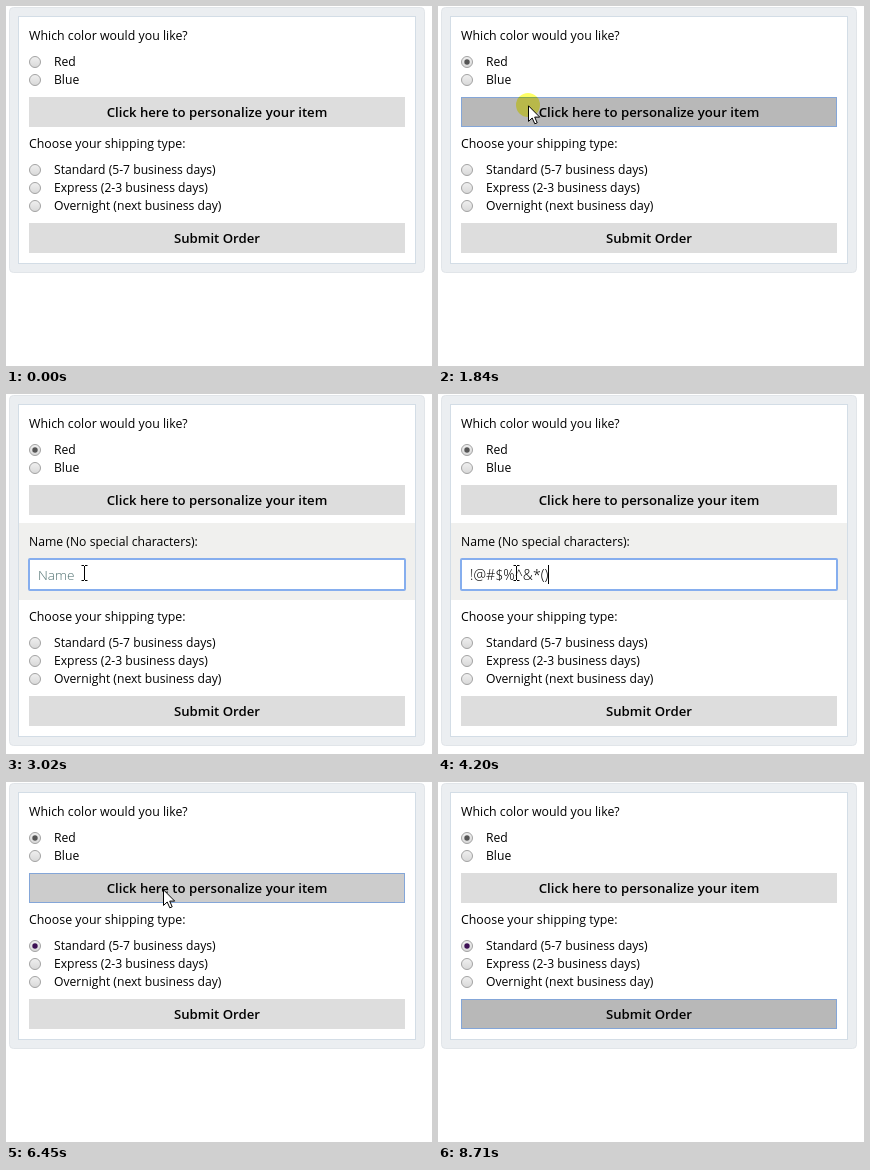
These frames come from a looping animation (426x360 px, 9410 ms). An HTML page:

```html
<!DOCTYPE html>
<html lang="en">
<head>
<meta charset="utf-8">
<title>Order form</title>
<style>
html, body { margin: 0; width: 100%; height: 100%; overflow: hidden; background: #fff; }
svg { display: block; width: 426px; height: 360px; }
text { font: 12.35px "Open Sans", "Noto Sans", sans-serif; fill: #000; white-space: pre; }
.btn { --face: #ddd; }
.btn.hover { --face: #ccc; }
.btn.down { --face: #b8b8b8; }
.btn rect { fill: var(--face); stroke: var(--face); }
.btn.focus rect { stroke: #84a6d8; }
.btn text { font-size: 13.2px; font-weight: 600; text-anchor: middle; }
.radio text { font-size: 12.15px; }
.radio circle { fill: url(#knob); stroke: #a3a3a3; }
.radio .dot { fill: #555; stroke: none; visibility: hidden; }
.radio.on .dot { visibility: visible; }
#standard .dot { fill: #3c1053; }
#nameLabel { font-size: 12.2px; }
#field { fill: #fff; stroke: #d9d9d9; }
#ring { fill: none; stroke: #86aeee; stroke-width: 2; }
#typed, #hint { font-size: 14.2px; font-weight: 300; }
#hint { font-size: 13.6px; fill: #4f7070; }
#spot { fill: #ffff66; mix-blend-mode: multiply; }
</style>
</head>
<body>
<svg viewBox="0 0 426 360">
  <defs>
    <linearGradient id="knob" x2="0" y2="1">
      <stop stop-color="#f0f0f0"/><stop offset="1" stop-color="#d8d8d8"/>
    </linearGradient>
  </defs>
  <rect id="frame" x="3.5" y="1.5" width="415" height="265" rx="4" fill="#ebeef1" stroke="#e1e5e9"/>
  <rect id="sheet" x="12.5" y="10.5" width="397" height="247" fill="#fff" stroke="#d3dde6"/>

  <text x="23" y="34">Which color would you like?</text>
  <g class="radio" id="red" data-y="56" data-label="Red"></g>
  <g class="radio" data-y="74" data-label="Blue"></g>
  <g class="btn" id="personalize">
    <rect x="23.5" y="91.5" width="375" height="29"/>
    <text x="211" y="111">Click here to personalize your item</text>
  </g>

  <g id="panel">
    <rect x="13" y="129" width="396" height="77" fill="#f0f0ee"/>
    <text id="nameLabel" x="23" y="152">Name (No special characters):</text>
    <rect id="field" x="23.5" y="165.5" width="375" height="30"/>
    <rect id="ring" x="23" y="165" width="376" height="31" rx="1"/>
    <text id="hint" x="32" y="186">Name</text>
    <text id="typed" x="32" y="186"></text>
    <rect id="caret" y="171" width="1" height="19"/>
  </g>

  <g id="lower">
    <text x="23" y="142">Choose your shipping type:</text>
    <g class="radio" id="standard" data-y="164" data-label="Standard (5-7 business days)"></g>
    <g class="radio" data-y="182" data-label="Express (2-3 business days)"></g>
    <g class="radio" data-y="200" data-label="Overnight (next business day)"></g>
    <g class="btn" id="submit">
      <rect x="23.5" y="217.5" width="375" height="29"/>
      <text x="211" y="237">Submit Order</text>
    </g>
  </g>

  <g id="pointer">
    <circle id="spot" r="12"/>
    <path id="arrow" d="M.5.8V16.4L4.2 13 6.8 18.8 9.2 17.8 6.7 12.1H11.7Z" fill="#fff" stroke="#000"/>
    <g id="beam" fill="none">
      <path d="M-3-7.5H4M.5-7V7M-3 7.5H4" stroke="#fff" stroke-width="2"/>
      <path d="M-2.5-7.5H0M1-7.5H3.5M.5-7V7M-2.5 7.5H0M1 7.5H3.5" stroke="#000"/>
    </g>
  </g>
</svg>
<script>
const LOOP = 9410, GROW = 85, KEYS = '!@#$%^&*()';
const $ = id => document.getElementById(id);

// start, end, number of steps, destination
const MOVES = [
  [140, 910, 11, 31, 56],
  [1140, 1140, 1, 30, 56],
  [1300, 1610, 5, 90, 99],
  [1920, 2070, 3, 85, 147],
  [2200, 2200, 1, 81, 166],
  [2410, 2410, 1, 78, 179],
  [4900, 5290, 6, 30, 246],
  [5440, 5440, 1, 30, 247],
  [5830, 6140, 5, 157, 107],
  [6540, 7000, 7, 223, 235],
  [8400, 8630, 4, 247, 336]
];
const CLICKS = [[1140, 1300], [1840, 1920], [2490, 2640], [5610, 5680], [6370, 6450], [7150, 7320]];
const CARET = [[2490, 3020], [3340, 4660], [5190, 5610]];
const FOCUS = [[1840, 2490], [6370, 7150]];
const STROKES = [3340, 3340, 3410, 3580, 3660, 3740, 3890, 3970, 4040, 4200];

const within = (t, spans) => spans.some(([a, b]) => t >= a && t < b);
const show = (id, on) => $(id).setAttribute('visibility', on ? 'inherit' : 'hidden');
const mark = (id, name, on) => $(id).classList.toggle(name, on);
const smooth = p => p * p * (3 - 2 * p);

function pointerAt(t) {
  let x = 200, y = 286;
  for (const [from, to, steps, tx, ty] of MOVES) {
    if (t < from) break;
    const done = t >= to ? steps : 1 + Math.floor((t - from) / (to - from) * (steps - 1));
    const p = smooth(done / steps);
    x += (tx - x) * p;
    y += (ty - y) * p;
  }
  return [Math.round(x), Math.round(y)];
}

function render(t) {
  const open = t >= 1920 && t < 6450;
  const grow = open ? GROW : 0;
  const visible = t >= 140 && t < 8710;
  const [x, y] = pointerAt(t);
  const over = top => visible && x >= 23 && x < 399 && y >= top && y < top + 30;

  $('frame').setAttribute('height', 265 + grow);
  $('sheet').setAttribute('height', 247 + grow);
  $('lower').setAttribute('transform', `translate(0 ${grow})`);
  $('panel').setAttribute('visibility', open ? 'visible' : 'hidden');

  mark('red', 'on', t >= 1300);
  mark('standard', 'on', t >= 5680);
  mark('personalize', 'hover', over(91));
  mark('personalize', 'down', within(t, [CLICKS[1], CLICKS[4]]));
  mark('personalize', 'focus', within(t, FOCUS));
  mark('submit', 'hover', over(217 + grow));
  mark('submit', 'down', t >= 7150);
  mark('submit', 'focus', t >= 7150);

  const text = KEYS.slice(0, STROKES.filter(s => t >= s).length);
  $('typed').textContent = text;
  show('hint', !text);
  show('ring', t >= 2490 && t < 5610);
  $('caret').setAttribute('x', 32 + Math.round(text ? $('typed').getComputedTextLength() : 0));
  show('caret', within(t, CARET));

  const beam = open && (y >= 140 && y < 156 || y >= 165 && y < 196) && x < 193;
  $('pointer').setAttribute('visibility', visible ? 'visible' : 'hidden');
  $('pointer').setAttribute('transform', `translate(${x} ${y})`);
  show('spot', within(t, CLICKS));
  show('arrow', !beam);
  show('beam', beam);
}

for (const g of document.querySelectorAll('.radio')) {
  const y = +g.dataset.y;
  g.innerHTML = `<circle cx="29" cy="${y}" r="5.5"/><circle class="dot" cx="29" cy="${y}" r="2.7"/>
    <text x="48" y="${y + 4}">${g.dataset.label}</text>`;
}

let start;
function tick(now) {
  start ??= now;
  render((now - start) % LOOP);
  requestAnimationFrame(tick);
}
render(0);
requestAnimationFrame(tick);
</script>
</body>
</html>
```
